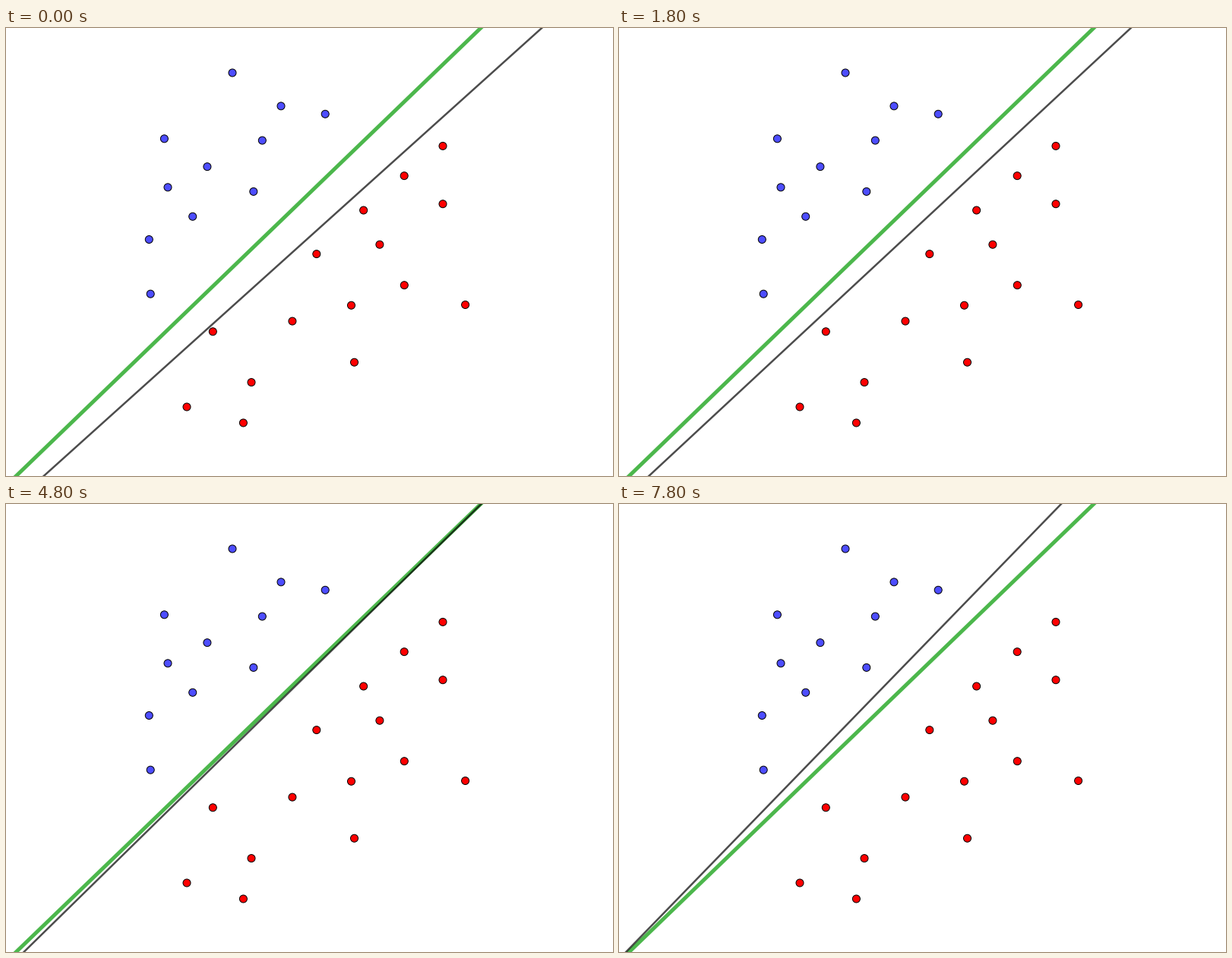
Animation, 799 px wide and 590 px high, one loop 8000 ms. Source, as a matplotlib script:

```python
import matplotlib.pyplot as plt
import numpy as np
from matplotlib.animation import FuncAnimation
from matplotlib.patches import Circle

WIDTH, HEIGHT, DPI = 799, 590, 100
INTERVAL, FRAMES = 100, 80
HOLD = 3                      # ticks between moves of the line
PX = 72 / DPI                 # one pixel in points
ENDS = np.array([-20, HEIGHT + 20])

# The thin line turns about a pivot off the stage, its slope growing evenly.
PIVOT_X, PIVOT_Y = -271.2, 878.8
SLOPE_START, SLOPE_STEP = 0.9, 0.005

# The wide line stays still.
GREEN_TOP, GREEN_BOTTOM = 624.9, 13.3

fig = plt.figure(figsize=(WIDTH / DPI, HEIGHT / DPI), dpi=DPI, facecolor="white")
ax = fig.add_axes([0, 0, 1, 1])
ax.set_xlim(0, WIDTH)
ax.set_ylim(HEIGHT, 0)
ax.axis("off")


def strand(start, end, color, count=2, ease=1, bow=0):
    """Dots from start to end, with eased spacing on a slightly bowed path."""
    for t in np.linspace(0, 1, count) ** ease:
        x, y = np.array(start) * (1 - t) + np.array(end) * t
        y += bow * 4 * t * (1 - t)
        ax.add_patch(Circle((x, y), 5, facecolor=color, edgecolor="black",
                            linewidth=PX, zorder=3))


def draw_blue_cloud():
    blue = (0.3, 0.3, 1)
    for start, end, count in [((188.3, 278.5), (325.8, 215.4), 3),
                              ((213, 209.8), (420.2, 113.3), 4)]:
        strand(start, end, blue, count, ease=1.26, bow=-4)
    strand((190.2, 350.2), (208.4, 145.8), blue)
    strand((298, 59), (362, 102.8), blue)


def draw_red_cloud():
    red = "red"
    strand((408.8, 297.6), (575, 155.4), red, 4, ease=0.9, bow=-5)
    strand((272.3, 399.8), (524.3, 338.7), red, 4, ease=0.8, bow=12)
    strand((312.4, 520), (604.6, 364.5), red, 3, bow=-2)
    strand((238, 499), (323, 466.6), red)
    strand((491.9, 285.2), (575, 231.7), red)


green_run = (GREEN_BOTTOM - GREEN_TOP) / HEIGHT
ax.plot(GREEN_TOP + green_run * ENDS, ENDS,
        color=(0, 0.6, 0), alpha=0.7, linewidth=5 * PX, zorder=1)
line, = ax.plot([], [], color="black", alpha=0.7, linewidth=2.5 * PX, zorder=2)
draw_blue_cloud()
draw_red_cloud()


def update(frame):
    slope = SLOPE_START + SLOPE_STEP * (frame // HOLD)
    line.set_data(PIVOT_X + (PIVOT_Y - ENDS) / slope, ENDS)
    return line,


anim = FuncAnimation(fig, update, frames=FRAMES, interval=INTERVAL,
                     repeat=True, repeat_delay=0)
plt.show()
```
